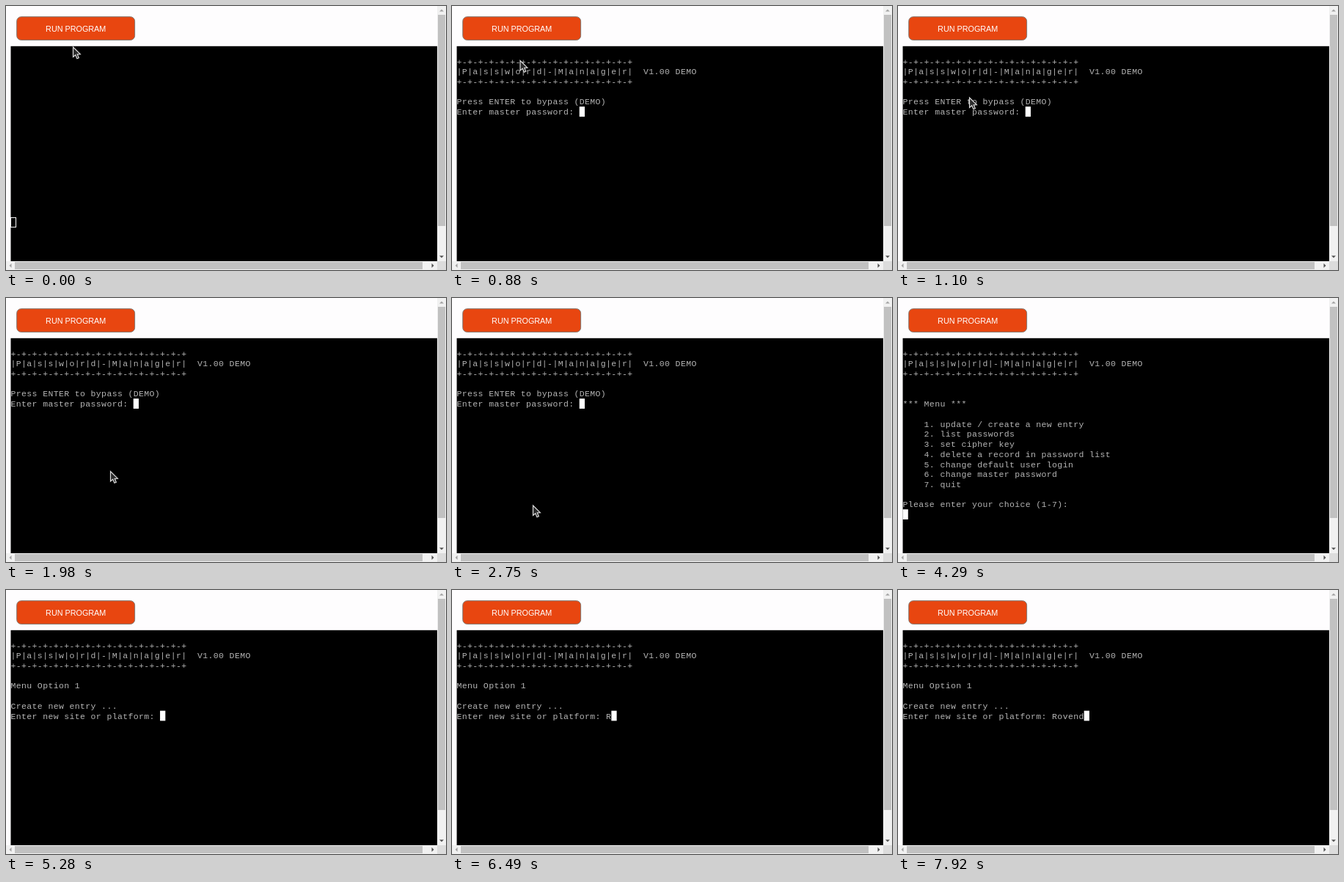
Animation of 600x360 px, one loop 8000 ms. Source, as an HTML page with a canvas:

```html
<!DOCTYPE html>
<html lang="en">
<head>
<meta charset="utf-8">
<title>Password manager demo</title>
<style>
  html, body { margin: 0; width: 100%; height: 100%; overflow: hidden; background: #fefdfe; }
  canvas { display: block; width: 600px; height: 360px; }
</style>
</head>
<body>
<canvas id="stage" width="600" height="360"></canvas>
<script>
const ctx = document.getElementById('stage').getContext('2d');
const LOOP = 8000;
const TERM = { x: 6.5, y: 54.8, col: 7.27, row: 13.73, base: 11, size: 11.5 };

const RULE = '+-'.repeat(16) + '+';
const TITLE = '|' + [...'Password-Manager'].join('|') + '|';
const HEADER = ['', RULE, TITLE + '  V1.00 DEMO', RULE, ''];
const LOGIN = [...HEADER, 'Press ENTER to bypass (DEMO)', 'Enter master password: '];
const ITEMS = [
  'update / create a new entry', 'list passwords', 'set cipher key',
  'delete a record in password list', 'change default user login',
  'change master password', 'quit'
].map((label, i) => `    ${i + 1}. ${label}`);
const MENU = [...HEADER, '', '*** Menu ***', '', ...ITEMS, '', 'Please enter your choice (1-7):', ''];
const ENTRY = [...HEADER, 'Menu Option 1', '', 'Create new entry ...', 'Enter new site or platform: '];

const SITE = 'Rovend';
const KEY_TIMES = [6490, 6710, 6930, 7040, 7700, 7920];

// Terminal contents; the block cursor follows the last line.
const SCREENS = [
  [0, Array(18).fill('')],
  [110, ['']],
  [220, ['Running startup command: python3 run.py']],
  [330, ['Running startup command: python3 run.py', '']],
  [880, LOGIN],
  [3410, [...LOGIN, '', 'Access granted, loading menu ...', '', '', '', '', '']],
  [4290, MENU],
  [4840, [...MENU.slice(0, -1), '1']],
  [5280, ENTRY]
];

const POINTER = [
  [0, 91.5, 55.5], [880, 93, 74], [990, 95, 101], [1100, 97.5, 124.5],
  [1650, 113, 138], [1760, 143, 178], [1870, 146.5, 218], [1980, 142.5, 236],
  [2310, 141.5, 236], [2640, 133, 251], [2750, 110.5, 282.5],
  [2860, 74, 318], [2970, 46.5, 336], [4070, -50, -50]
];

const latest = (steps, t) => steps.filter(s => s[0] <= t).pop();

function rect(x, y, w, h, fill) {
  ctx.fillStyle = fill;
  ctx.fillRect(x, y, w, h);
}

function shape(points, fill) {
  ctx.beginPath();
  points.forEach(([x, y]) => ctx.lineTo(x, y));
  ctx.closePath();
  ctx.fillStyle = fill;
  ctx.fill();
}

function drawArrow(x, y, angle, fill) {
  ctx.save();
  ctx.translate(x, y);
  ctx.rotate(angle);
  shape([[-3, 1.5], [0, -1.5], [3, 1.5]], fill);
  ctx.restore();
}

function drawPage() {
  rect(0, 0, 600, 360, '#fefdfe');

  ctx.beginPath();
  ctx.roundRect(14.7, 14.7, 160.9, 31.7, 6);
  ctx.fillStyle = '#e84610';
  ctx.fill();
  ctx.strokeStyle = '#80766f';
  ctx.lineWidth = 1;
  ctx.stroke();
  ctx.fillStyle = '#fff';
  ctx.font = '10.8px "Liberation Sans", Arial, sans-serif';
  ctx.letterSpacing = '0px';
  ctx.textAlign = 'center';
  ctx.fillText('RUN PROGRAM', 95.2, 34.8);

  rect(588, 0, 12, 348, '#f1f1f1');
  rect(589, 12, 10, 288, '#c1c1c1');
  rect(0, 348, 588, 12, '#f1f1f1');
  rect(12, 349, 556, 10, '#c1c1c1');
  rect(588, 348, 12, 12, '#dcdcdc');
  drawArrow(594, 6, 0, '#a3a3a3');
  drawArrow(594, 342, Math.PI, '#505050');
  drawArrow(6, 354, -Math.PI / 2, '#a3a3a3');
  drawArrow(582, 354, Math.PI / 2, '#505050');
}

function drawTerminal(t) {
  const typed = SITE.slice(0, KEY_TIMES.filter(k => k <= t).length);
  const lines = [...latest(SCREENS, t)[1]];
  const last = lines.length - 1;
  lines[last] += typed;

  rect(6.5, 54.8, 581.5, 293.2, '#000');
  ctx.font = `${TERM.size}px "Liberation Mono", "Courier New", monospace`;
  ctx.letterSpacing = `${TERM.col - TERM.size * 0.6}px`;
  ctx.textAlign = 'left';
  ctx.fillStyle = '#b4b4b4';
  lines.forEach((line, i) => ctx.fillText(line, TERM.x, TERM.y + i * TERM.row + TERM.base));

  const x = TERM.x + lines[last].length * TERM.col;
  const y = TERM.y + last * TERM.row;
  if (t < 110) {
    ctx.strokeStyle = '#fff';
    ctx.lineWidth = 1;
    ctx.strokeRect(x, y + 0.4, 7, 13);
  } else {
    rect(x, y, TERM.col, TERM.row, '#fff');
  }
}

function drawPointer(t) {
  const [, x, y] = latest(POINTER, t);
  ctx.save();
  ctx.translate(x, y);
  shape([[0, 0.5], [0, 14], [3.2, 11.2], [5.4, 16.3], [7.8, 15.3], [5.7, 10.3], [9.8, 10.1]], '#2c2c2c');
  ctx.strokeStyle = '#dcdcdc';
  ctx.lineWidth = 1.2;
  ctx.stroke();
  ctx.restore();
}

const start = performance.now();

function frame() {
  const t = (performance.now() - start) % LOOP;
  drawPage();
  drawTerminal(t);
  drawPointer(t);
  requestAnimationFrame(frame);
}
frame();
</script>
</body>
</html>
```
